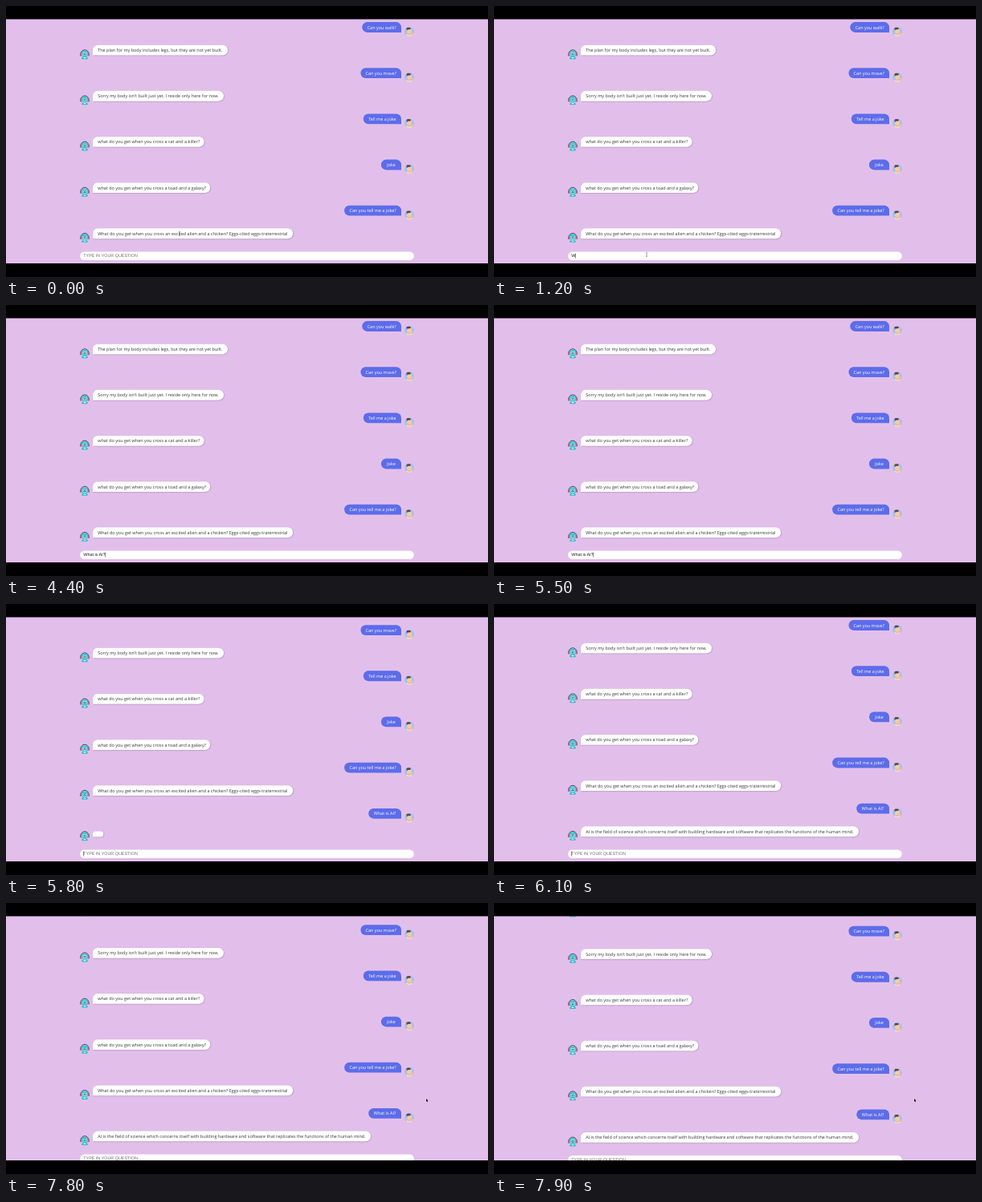
An HTML page with a canvas for the animation above (8 s loop, 600x338 px).

```html
<!DOCTYPE html>
<html lang="en">
<head>
<meta charset="utf-8">
<title>Chat</title>
<style>
html, body { margin: 0; width: 100%; height: 100%; overflow: hidden; background: #000; }
canvas { display: block; width: 600px; height: 338px; }
</style>
</head>
<body>
<canvas id="stage"></canvas>
<script>
const W = 600, H = 338, LOOP = 8000;
const TOP = 16.5, BOTTOM = 321, STEP = 57.17, HALF = STEP / 2;
const CHAT_FONT = "5.475px 'Open Sans', 'Noto Sans', sans-serif";
const INPUT_FONT = "5.4px 'Liberation Sans', Arial, sans-serif";

const canvas = document.getElementById('stage');
const ctx = canvas.getContext('2d');
const ratio = window.devicePixelRatio || 1;
canvas.width = W * ratio;
canvas.height = H * ratio;
ctx.textRendering = 'geometricPrecision';

// user bubbles keep their left edge, bot bubbles their right edge
const chat = [
  ['Can you walk?', 443.3, 'The plan for my body includes legs, but they are not yet built.', 276],
  ['Can you move?', 441.5, "Sorry my body isn't built just yet. I reside only here for now.", 271],
  ['Tell me a joke', 444.8, 'what do you get when you cross a cat and a killer?', 246.6],
  ['Joke', 467, 'what do you get when you cross a toad and a galaxy?', 254.3],
  ['Can you tell me a joke?', 421.2, 'What do you get when you cross an excited alien and a chicken? Eggs-cited eggs-traterrestrial', 357.2],
  ['What is AI?', 451.3, 'AI is the field of science which concerns itself with building hardware and software that replicates the functions of the human mind.', 454.1]
];
const question = 'What is AI?';
const keys = [1200, 2300, 2400, 2500, 2600, 2900, 3100, 3300, 3800, 3900, 4400];
const SENT = 5800, ANSWERED = 6100;

const beamPath = [[0, 216, 284], [100, 214, 286], [600, 190, 310]];
const arrowPath = [[6600, 300, 295], [6800, 383.7, 266.3], [7000, 430, 257], [7400, 509, 246.5], [7600, 523, 244]];
const scrollPath = [[7500, 0], [7600, 1.5], [7700, 4.6], [7800, 7.2], [7900, 8.6]];

function along(path, t) {
  if (t <= path[0][0]) return path[0].slice(1);
  for (let i = 1; i < path.length; i++) {
    const a = path[i - 1], b = path[i];
    if (t <= b[0]) {
      const k = (t - a[0]) / (b[0] - a[0]);
      return a.slice(1).map((v, n) => v + (b[n + 1] - v) * k);
    }
  }
  return path[path.length - 1].slice(1);
}

function shape(color, draw) {
  ctx.fillStyle = color;
  ctx.beginPath();
  draw();
  ctx.fill();
}
const box = (x, y, w, h, r, color) => shape(color, () => ctx.roundRect(x, y, w, h, r));
const oval = (x, y, rx, ry, color) => shape(color, () => ctx.ellipse(x, y, rx, ry, 0, 0, Math.PI * 2));

function text(str, x, y, color, font, align = 'left') {
  ctx.font = font;
  ctx.textAlign = align;
  ctx.fillStyle = color;
  ctx.fillText(str, x, y);
}

function robot(x, y) {
  ctx.strokeStyle = '#3c4a66';
  ctx.lineWidth = 1;
  ctx.beginPath();
  ctx.arc(x, y - 0.6, 5, Math.PI, 0);
  ctx.stroke();
  box(x - 6, y - 1.8, 1.8, 3.8, 0.9, '#b8506e');
  box(x + 4.2, y - 1.8, 1.8, 3.8, 0.9, '#b8506e');
  box(x - 4.4, y - 4.2, 8.8, 7, 3, '#2cc3cf');
  box(x - 3.2, y - 2.3, 6.4, 3.9, 1.8, '#e2fbfb');
  box(x - 2.6, y - 1.7, 5.2, 2.7, 1.3, '#2a7f99');
  oval(x - 1.2, y - 0.4, 0.7, 0.8, '#c8ffff');
  oval(x + 1.2, y - 0.4, 0.7, 0.8, '#c8ffff');
  box(x - 3.8, y + 3.1, 7.6, 2.7, [2, 2, 0.8, 0.8], '#27bac8');
  box(x - 1.5, y + 3.5, 3, 1.3, 0.5, '#d5f8f8');
}

function person(x, y) {
  ctx.save();
  ctx.beginPath();
  ctx.arc(x, y, 6, 0, Math.PI * 2);
  ctx.clip();
  box(x - 6, y - 6, 12, 12, 0, '#a5c3ec');
  oval(x, y + 6.2, 4.4, 3.2, '#f3dcc4');
  box(x - 1.3, y + 1, 2.6, 3.4, 1, '#e8b08c');
  oval(x, y - 0.6, 2.9, 3.5, '#f6cba8');
  oval(x - 0.8, y - 3.7, 2.8, 1.4, '#54454f');
  box(x - 3.4, y - 3.6, 1, 2.4, 0.5, '#54454f');
  oval(x + 3.6, y + 2.4, 1.2, 1.8, '#f0bd94');
  ctx.restore();
}

function userRow(str, left, y) {
  box(left, y - 6.4, 492 - left, 12.8, [6.2, 6.2, 0.5, 6.2], '#5d6ce9');
  text(str, (left + 492) / 2, y + 2, '#fff', CHAT_FONT, 'center');
  person(502, y + 5.3);
}

function botRow(str, right, y) {
  const h = str ? 12.8 : 7, top = y + 6.4 - h, r = Math.min(6.2, h / 2);
  ctx.save();
  ctx.shadowColor = 'rgba(70,40,90,.35)';
  ctx.shadowBlur = 1.4 * ratio;
  ctx.shadowOffsetX = ctx.shadowOffsetY = 0.5 * ratio;
  box(108, top, right - 108, h, [r, r, r, 0.5], '#fff');
  ctx.restore();
  text(str, 114.2, y + 2, '#36343a', CHAT_FONT);
  robot(98, y + 5.3);
}

function caretOn(t) {
  if (t < 1000 || t >= 6400) return false;
  return !(t >= 1700 && t < 2300) && !(t >= 4900 && t < 5500);
}

function inputBar(t, dy) {
  const typed = t < SENT ? question.slice(0, keys.filter(k => t >= k).length) : '';
  box(92.2, 306.4 + dy, 415.6, 10.6, 5.3, '#fff');
  text(typed || 'TYPE IN YOUR QUESTION', 96.3, 313.2 + dy, typed ? '#1c1a1e' : '#6d6870', INPUT_FONT);
  if (caretOn(t)) {
    const x = 96.3 + (typed ? ctx.measureText(typed).width : 0);
    box(x, 308.6 + dy, 0.5, 5.8, 0, '#111');
  }
}

function beam(x, y) {
  box(x - 0.3, y - 2.6, 0.6, 5.2, 0, '#555');
  box(x - 1, y - 2.8, 2, 0.5, 0, '#777');
  box(x - 1, y + 2.3, 2, 0.5, 0, '#777');
}

function arrow(x, y) {
  const pts = [[0, 0], [0, 3.8], [0.9, 3], [1.6, 4.5], [2.2, 4.2], [1.6, 2.8], [2.8, 2.7]];
  ctx.beginPath();
  pts.forEach(([a, b]) => ctx.lineTo(x + a, y + b));
  ctx.closePath();
  ctx.lineWidth = 0.5;
  ctx.strokeStyle = 'rgba(255,255,255,.7)';
  ctx.stroke();
  ctx.fillStyle = '#111';
  ctx.fill();
}

function render(t) {
  ctx.setTransform(ratio, 0, 0, ratio, 0, 0);
  ctx.fillStyle = '#e2bfeb';
  ctx.fillRect(0, 0, W, H);

  const dy = along(scrollPath, t)[0];
  const sent = t >= SENT, waiting = sent && t < ANSWERED;
  const first = 26.5 + dy - (sent ? STEP : 0) + (waiting ? 6.1 : 0);
  chat.slice(0, sent ? 6 : 5).forEach(([ask, left, reply, right], i) => {
    const y = first + i * STEP;
    userRow(ask, left, y);
    if (i === 5 && waiting) botRow('', 121.3, 284.1);
    else botRow(reply, right, y + HALF);
  });
  inputBar(t, dy);

  if (t < 1700) beam(...along(beamPath, t));
  if (t >= 6600) arrow(...along(arrowPath, t));

  ctx.fillStyle = '#000';
  ctx.fillRect(0, 0, W, TOP);
  ctx.fillRect(0, BOTTOM, W, H - BOTTOM);
}

const start = performance.now();
function tick() {
  const t = (performance.now() - start) % LOOP;
  render(Math.floor(t / 100) * 100);
  requestAnimationFrame(tick);
}
tick();
</script>
</body>
</html>
```
